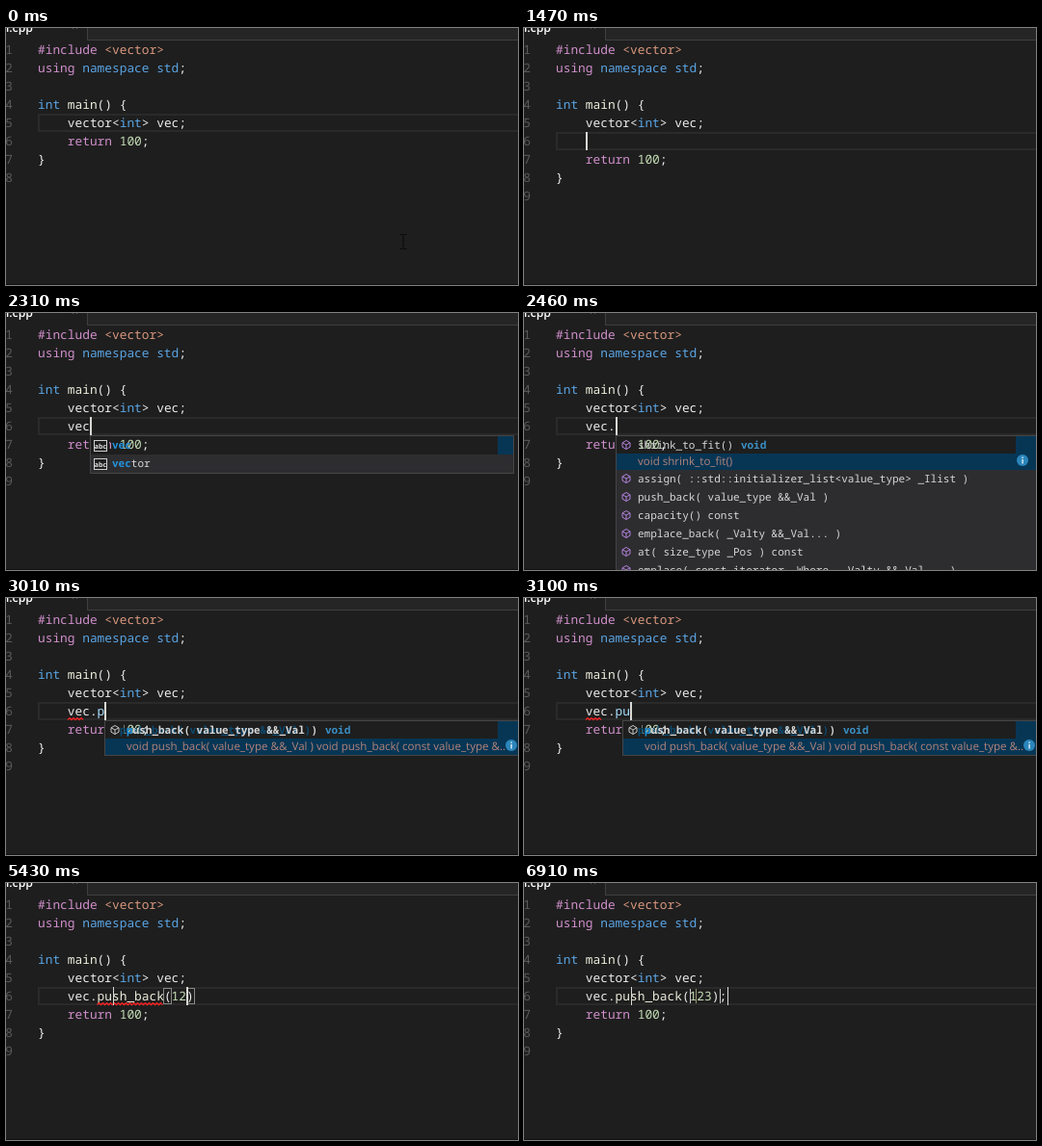
Animation of 531x267 px, one loop 8.39 s. Source, as an HTML page with a canvas:

```html
<!DOCTYPE html>
<html lang="en">
<head>
<meta charset="utf-8">
<title>Code completion</title>
<style>
html, body { margin: 0; width: 100%; height: 100%; overflow: hidden; background: #1e1e1e; }
canvas { display: block; }
</style>
</head>
<body>
<canvas id="stage"></canvas>
<script>
const W = 531, H = 267, LOOP = 8390;
const LEFT = 33, CELL = 7.7, TOP = 13, ROW = 19;
const MONO = '"Noto Sans Mono", "DejaVu Sans Mono", monospace';
const SANS = '"Open Sans", "Noto Sans", sans-serif';
const CODE = `500 12.83px ${MONO}`, LIST = `11px ${MONO}`, LIST_BOLD = `bold 11px ${MONO}`;
const C = {
  bg: '#1e1e1e', text: '#ececec', pink: '#d08fcb', blue: '#5aa5e4', str: '#d8977e',
  fn: '#ececdc', num: '#c3dcb4', member: '#a8e0ff', gutter: '#5a5a5a', red: '#f02222',
  caret: '#d8d8d4', list: '#2d2d30', edge: '#454545', pick: '#073655', match: '#2492dc',
  item: '#d8d8d8'
};

const canvas = document.getElementById('stage');
const ctx = canvas.getContext('2d');
const ratio = window.devicePixelRatio || 1;
canvas.width = W * ratio;
canvas.height = H * ratio;
canvas.style.width = W + 'px';
canvas.style.height = H + 'px';
ctx.scale(ratio, ratio);
ctx.textRendering = 'geometricPrecision';

// Runs of [text, colour] for each line of the file
const head = [
  [['#include ', C.pink], ['<vector>', C.str]],
  [['using ', C.pink], ['namespace std', C.blue], [';', C.text]],
  [],
  [['int', C.blue], [' main', C.fn], ['() {', C.text]],
  [['    vector<', C.text], ['int', C.blue], ['> vec;', C.text]]
];
const tail = [
  [['    return ', C.pink], ['100', C.num], [';', C.text]],
  [['}', C.text]],
  []
];

// Typed line over time; the bar marks the caret
const typing = [
  [1470, '|'], [1930, 'v|'], [2080, 've|'], [2230, 'vec|'], [2460, 'vec.|'],
  [3010, 'vec.p|'], [3100, 'vec.pu|'], [4100, 'vec.push_back|'],
  [4720, 'vec.push_back(|)'], [5260, 'vec.push_back(1|)'], [5430, 'vec.push_back(12|)'],
  [5580, 'vec.push_back(123|)'], [5810, 'vec.push_back(123)|'], [6360, 'vec.push_back(123);|']
];

// Popup over time: kind, caret column, matched letters
const popups = [
  [2000, 'word', 5, 1], [2080, 'word', 6, 2], [2310, 'word', 7, 3],
  [2460, 'all', 8, 0], [3010, 'push', 9, 1], [3180, 'push', 10, 2], [4100, '', 0, 0]
];
const methods = [
  'assign( ::std::initializer_list<value_type> _Ilist )',
  'push_back( value_type &&_Val )',
  'capacity() const',
  'emplace_back( _Valty &&_Val... )',
  'at( size_type _Pos ) const',
  'emplace( const_iterator _Where, _Valty &&_Val... )'
];

const pointer = [
  [0, 412, 222], [70, 277, 121], [150, 272, 115], [230, 266, 109], [300, 262, 105],
  [540, 300, 128], [620, 348, 158], [700, 391, 183], [780, 412, 222]
];

const colX = col => LEFT + col * CELL;
const lineY = n => TOP + (n - 1) * ROW;
const at = (table, t) => table.filter(s => s[0] <= t).pop();

function rect(x, y, w, h, color) {
  ctx.fillStyle = color;
  ctx.fillRect(x, y, w, h);
}

function text(s, x, y, color, font) {
  ctx.font = font;
  ctx.fillStyle = color;
  ctx.fillText(s, x, y);
}

function runs(parts, n, col = 0) {
  for (const [s, color] of parts) {
    text(s, colX(col), lineY(n) + 14, color, CODE);
    col += s.length;
  }
}

function squiggle(x1, x2) {
  ctx.strokeStyle = C.red;
  ctx.lineWidth = 1.4;
  ctx.beginPath();
  for (let x = x1, i = 0; x <= x2; x += 2, i++) ctx.lineTo(x, i % 2 ? 124.7 : 126.6);
  ctx.stroke();
}

function drawChrome() {
  rect(0, 0, W, H, C.bg);
  rect(84, 0, W - 84, 12, '#252526');
  rect(84, 0, 1, 13, '#3f3f40');
  rect(84, 12, W - 84, 1, '#3f3f40');
  ctx.textAlign = 'right';
  text('main.cpp', 28, 4, '#ffffff', `600 12.3px ${SANS}`);
  ctx.textAlign = 'left';
  ctx.strokeStyle = '#555';
  ctx.lineWidth = 1;
  ctx.beginPath();
  ctx.moveTo(69, -4); ctx.lineTo(74, 1);
  ctx.moveTo(74, -4); ctx.lineTo(69, 1);
  ctx.stroke();
  rect(0, H - 1, W, 1, '#101010');
}

function drawFile(added) {
  const y = lineY(added ? 6 : 5);
  ctx.strokeStyle = '#2a2a2a';
  ctx.lineWidth = 2;
  ctx.strokeRect(LEFT + 1, y + 1, W, ROW - 2);
  const count = added ? 9 : 8;
  for (let n = 1; n <= count; n++) text(String(n), -0.8, lineY(n) + 14, C.gutter, CODE);
  head.forEach((parts, i) => runs(parts, i + 1));
  tail.forEach((parts, i) => runs(parts, i + (added ? 7 : 6)));
}

function drawTyped(t) {
  const raw = at(typing, t)[1];
  const caret = colX(4 + raw.indexOf('|'));
  const line = raw.replace('|', '');
  const [, object, member, rest] = line.match(/^(\w*\.?)(\w*)(.*)$/);
  const digits = rest.replace(/\D/g, '');
  runs([
    [object, C.text],
    [member, t >= 4800 ? C.fn : C.member],
    [rest.slice(0, 1), C.text],
    [digits, C.num],
    [rest.slice(1 + digits.length), C.text]
  ], 6, 4);

  const y = lineY(6);
  if (t >= 4720 && t < 6360) {
    ctx.strokeStyle = '#888888';
    ctx.lineWidth = 1;
    for (const col of [17, 18 + digits.length])
      ctx.strokeRect(Math.floor(colX(col)) + 0.5, y + 1.5, 8, 16);
  }
  if (t >= 6360) {
    // borders left behind by the bracket marks
    rect(172, y + 2, 1, 15, '#c8c8c8');
    rect(178, y + 2, 1, 15, '#9a9a70');
    rect(203, y + 2, 1, 15, '#c8c8c8');
  }
  if (t >= 2690 && t < 3560) squiggle(64, 80);
  if (t >= 4800 && t < 5960) squiggle(94.5, 164);

  // a blinked-out caret leaves a thin bar
  const thin = (t >= 3640 && t < 4100) || (t >= 4570 && t < 4720) || t >= 6910;
  const x = Math.round(caret);
  rect(thin ? x + 1 : x, y, thin ? 1 : 2, ROW, C.caret);
  if (t >= 3640) rect(111, y, 1, ROW, C.caret);
}

function cube(x, y, color) {
  ctx.strokeStyle = color;
  ctx.lineWidth = 1;
  ctx.beginPath();
  ctx.moveTo(x, y - 4.5);
  for (const [dx, dy] of [[4, -2.2], [4, 2.2], [0, 4.5], [-4, 2.2], [-4, -2.2]])
    ctx.lineTo(x + dx, y + dy);
  ctx.closePath();
  ctx.moveTo(x - 4, y - 2.2);
  ctx.lineTo(x, y);
  ctx.lineTo(x + 4, y - 2.2);
  ctx.moveTo(x, y);
  ctx.lineTo(x, y + 4.5);
  ctx.stroke();
}

function abcIcon(x, y) {
  rect(x - 7, y - 6, 14, 12, C.bg);
  ctx.strokeStyle = '#d0d0d0';
  ctx.lineWidth = 1;
  ctx.strokeRect(x - 6.5, y - 5.5, 13, 11);
  ctx.textAlign = 'center';
  text('abc', x, y + 2.5, '#e0e0e0', `bold 7px ${SANS}`);
  ctx.textAlign = 'left';
}

function label(s, x, y, matched, font = LIST) {
  text(s.slice(0, matched), x, y, C.match, LIST_BOLD);
  text(s.slice(matched), x + matched * 6.6, y, C.item, font);
}

function infoIcon(x, y) {
  ctx.fillStyle = '#2b86bb';
  ctx.beginPath();
  ctx.arc(x, y, 6, 0, Math.PI * 2);
  ctx.fill();
  rect(x - 0.5, y - 3.5, 1.2, 1.5, '#fff');
  rect(x - 0.5, y - 1, 1.2, 4.5, '#fff');
}

// The top row hides the code only under its icon and at its far end
function topRow(x) {
  rect(x, 128, 20, 19, C.bg);
  rect(510, 128, x + 439 - 510, 19, C.pick);
}

function wordList(x, matched) {
  rect(x, 147, 440, 19, C.list);
  ['vec', 'vector'].forEach((word, i) => {
    abcIcon(x + 11, 138 + i * ROW);
    label(word, x + 23, 141 + i * ROW, matched);
  });
}

function methodList(x, full, matched) {
  const name = full ? 'shrink_to_fit()' : methods[1];
  const detail = full ? 'void shrink_to_fit()'
    : 'void push_back( value_type &&_Val ) void push_back( const value_type &..';
  if (full) rect(x, 163, 440, H - 163, C.list);
  rect(x, 146, 440, 17, C.pick);
  if (!full) text(name, x + 16, 141, '#0b4a70', LIST_BOLD);
  cube(x + 11, 137, full ? '#b180d7' : '#c5c5c5');
  label(name, x + 23, 141, matched, full ? LIST : LIST_BOLD);
  text('void', x + 23 + (name.length + 1.2) * 6.6, 141, '#3a8fc4', LIST_BOLD);
  text(detail, x + 23, 158, '#b5837a', `11.55px ${SANS}`);
  infoIcon(x + 422, 153);
  if (full) methods.forEach((m, i) => {
    cube(x + 11, 172 + i * ROW, '#b180d7');
    label(m, x + 23, 176 + i * ROW, 0);
  });
}

function drawPopup(t) {
  const step = at(popups, t);
  if (!step || !step[1]) return;
  const [, kind, col, matched] = step;
  const x = Math.round(colX(col));
  const bottom = { word: 167, all: H + 5, push: 164 }[kind];
  topRow(x);
  if (kind === 'word') wordList(x, matched);
  else methodList(x, kind === 'all', matched);
  ctx.strokeStyle = C.edge;
  ctx.lineWidth = 1;
  ctx.strokeRect(x + 0.5, 127.5, 439, bottom - 128);
}

function drawPointer(t) {
  const [, x, y] = at(pointer, t);
  const color = t >= 70 && t < 780 ? '#6a6a6a' : '#080808';
  rect(x - 0.5, y - 7, 1, 14, color);
  for (const dy of [-8, 7]) {
    rect(x - 3.5, y + dy, 3, 1, color);
    rect(x + 0.5, y + dy, 3, 1, color);
  }
}

function draw(t) {
  const added = t >= 1470;
  drawChrome();
  drawFile(added);
  if (added) {
    drawTyped(t);
    drawPopup(t);
  } else {
    drawPointer(t);
  }
}

const start = performance.now();
function tick() {
  draw((performance.now() - start) % LOOP);
  requestAnimationFrame(tick);
}
tick();
</script>
</body>
</html>
```
